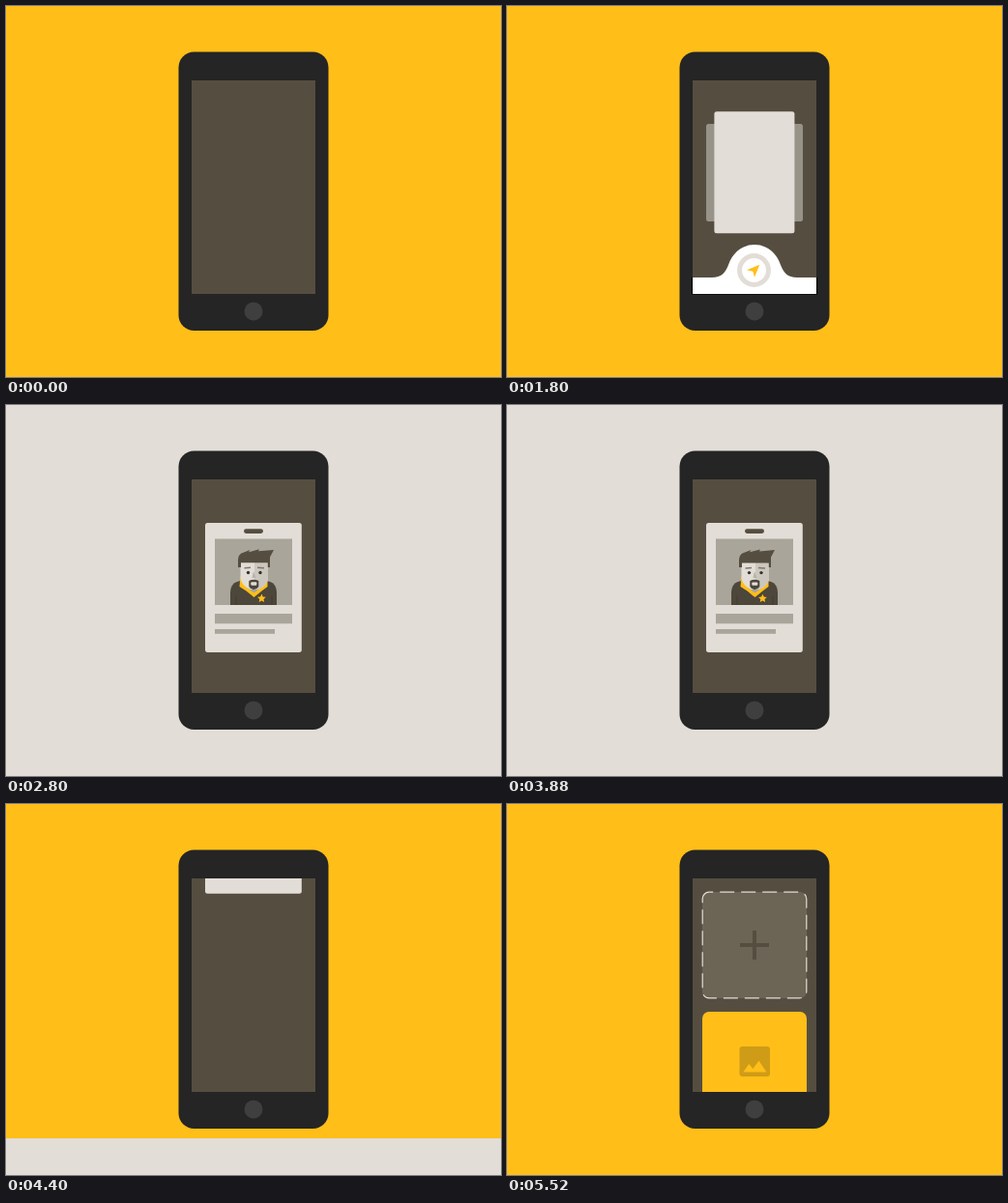
An HTML page for the animation above (6320 ms loop, 512 px wide and 384 px high).

```html
<!DOCTYPE html>
<html lang="en">
<head>
<meta charset="utf-8">
<title>Phone badge loop</title>
<style>
html, body { margin: 0; width: 100%; height: 100%; overflow: hidden; background: #ffbe18; }
svg { display: block; width: 100%; height: 100%; }
</style>
</head>
<body>
<svg viewBox="0 0 512 384">
  <defs>
    <clipPath id="screenClip"><rect x="192" y="77" width="128" height="221"/></clipPath>
    <clipPath id="barClip"><rect x="191" y="77" width="130" height="221.5"/></clipPath>
    <clipPath id="wipeClip"><rect id="wipe" x="216" y="138" width="80" height="100"/></clipPath>
    <clipPath id="photoClip"><rect x="216" y="138.5" width="80" height="68.5"/></clipPath>
  </defs>

  <rect width="512" height="384" fill="#ffbe18"/>
  <rect id="backdrop" width="512" height="384" fill="#e2ddd6"/>

  <rect x="178.5" y="47.5" width="155" height="288.5" rx="16" fill="#252525"/>
  <rect x="192" y="77" width="128" height="221" fill="#554e40"/>
  <circle cx="256" cy="316" r="9.5" fill="#3f3f3f"/>

  <g clip-path="url(#screenClip)">
    <rect id="side" x="206" y="122" width="100" height="101" rx="2.5" fill="#e2ddd6" opacity=".48"/>
    <rect id="card" rx="2.5" fill="#e2ddd6"/>

    <g id="badge">
      <rect id="slot" x="246" y="128.2" width="20" height="4.8" rx="2.4" fill="#554e40"/>
      <g clip-path="url(#wipeClip)">
        <g fill="#aaa59b">
          <rect x="216" y="138.5" width="80" height="68.5"/>
          <rect x="216" y="216" width="80" height="10.3"/>
          <rect x="216" y="232" width="62" height="4.8"/>
        </g>
        <g clip-path="url(#photoClip)">
          <g id="person">
            <path d="M232 208V195Q232 183 243 182H269Q280 183 280 195V208Z" fill="#4d463a"/>
            <path d="M238 197V208M275 197V208" stroke="#3f392f" stroke-width=".8"/>
            <path d="M242.500 177H270.500V188L264.500 192.500 256.500 199 248.500 192.500 241.500 188Z" fill="#ffbe18"/>
            <path d="M249 189H264L256.500 194.500Z" fill="#aaa59b"/>
            <path d="M242.500 161H271V180Q270 187 261 191H252.500Q244 187 242.500 180Z" fill="#e2ddd6"/>
            <path d="M257 161H271V180Q270 187 261 191H257Z" fill="#cbc7bf"/>
            <path d="M240 168V160Q240 154 246 152.500L252.500 150 251 152.200 262 149.300 261 151.300 277 150 273 157.500V168H270.800V163.300H243V168Z" fill="#554e40"/>
            <path d="M246.500 168.800L253 168.300M260 168.300L267 168.800" stroke="#7d766a" stroke-width="1.500"/>
            <circle cx="250.500" cy="173.500" r="1.700" fill="#38332a"/>
            <circle cx="263" cy="173.500" r="1.700" fill="#38332a"/>
            <path d="M256 172L254.500 179H258.500Z" fill="#b9b4aa"/>
            <path d="M251.300 182Q256.300 179.500 261.300 182V188Q259.500 191 256.300 191 253 191 251.300 188Z" fill="#4d463a"/>
            <rect x="253.300" y="183.300" width="6" height="3.400" rx="1" fill="#e2ddd6"/>
            <path id="star" fill="#ffbe18"/>
          </g>
        </g>
      </g>
    </g>

    <g id="addBox">
      <rect x="202" y="91" width="108" height="110" rx="7" fill="#6c6555"/>
      <rect x="202.200" y="91.200" width="107.600" height="109.600" rx="7" fill="none" stroke="#e2ddd6"
        stroke-width="1.200" stroke-dasharray="15 7" stroke-dashoffset="11"/>
      <path d="M241 146H271M256 131V161" stroke="#554e40" stroke-width="4"/>
    </g>
    <g id="imageBox">
      <rect x="202" y="215" width="108" height="110" rx="7" fill="#ffbe18"/>
      <rect x="240.500" y="251" width="31.500" height="31" rx="3" fill="#cf9c17"/>
      <path d="M244.300 277.500L250.300 269 254.300 274 260.500 265.800 268.500 277.500Z" fill="#ffbe18"/>
    </g>
  </g>

  <g id="bar" clip-path="url(#barClip)">
    <g id="barBody">
      <rect x="191" y="281" width="130" height="18" fill="#000"/>
      <path id="bump" fill="#fff"/>
      <g id="button">
        <circle cx="255.500" cy="273.500" r="17.500" fill="#e2ddd6"/>
        <circle cx="255.500" cy="273.500" r="12.500" fill="#fff"/>
        <path d="M261.300 267.800L248 273.300 254.400 274.800 256 280.800Z" fill="#ffbe18"/>
      </g>
    </g>
  </g>
</svg>
<script>
const LOOP = 6320, STEP = 40;
const el = {};
document.querySelectorAll('[id]').forEach(n => el[n.id] = n);

const inOut = u => u < .5 ? 4 * u ** 3 : 1 - 4 * (1 - u) ** 3;
const inOutQuad = u => u < .5 ? 2 * u * u : 1 - 2 * (1 - u) ** 2;
const out = u => 1 - (1 - u) ** 3;
const mix = (a, b, k) => a + (b - a) * k;

// Eased progress of t from start to end
const ramp = (t, start, end, ease = inOut) =>
  ease(Math.min(1, Math.max(0, (t - start) / (end - start))));

const set = (node, attrs) => {
  for (const key in attrs) node.setAttribute(key, attrs[key]);
};
const show = (node, on) => set(node, { display: on ? 'inline' : 'none' });
const shift = (node, y) => set(node, { transform: `translate(0 ${y})` });
const scale = (node, x, y, k) =>
  set(node, { transform: `translate(${x} ${y}) scale(${k}) translate(${-x} ${-y})` });

function starPath(x, y, r) {
  const points = Array.from({ length: 10 }, (_, i) => {
    const a = i * Math.PI / 5 - Math.PI / 2, d = i % 2 ? r * .48 : r;
    return `${x + d * Math.cos(a)} ${y + d * Math.sin(a)}`;
  });
  return `M${points.join('L')}Z`;
}

// White bar with a hump that narrows as it sinks
function bumpPath(k) {
  const wide = [44, 34, 30, 27, 23, 13, 0], flat = [30, 24, 19, 15, 11, 7, 0];
  const tall = [0, 0, .15, .38, .74, 1, 1], low = [0, 0, .2, .5, .8, 1, 1];
  const left = wide.map((w, i) =>
    [256 - mix(flat[i], w, k), 281 - 34 * k * mix(low[i], tall[i], k)]);
  const right = left.slice(0, -1).reverse().map(([x, y]) => [512 - x, y]);
  const [first, ...rest] = [...left, ...right];
  return `M192 281H${first[0]}C${rest.join(' ')}H320V298H192Z`;
}

function drawCards(t) {
  const rise = 189 * (1 - ramp(t, 20, 460, out));
  const grow = ramp(t, 1970, 2360, inOutQuad);
  const leave = 179 * ramp(t, 4195, 4480);
  set(el.card, {
    x: mix(214.4, 206, grow),
    y: mix(109.2, 122, grow) + rise - leave,
    width: mix(83, 99.8, grow),
    height: mix(126, 134, grow)
  });
  const spread = ramp(t, 600, 760, out) - ramp(t, 1984, 2144, inOutQuad);
  show(el.side, t > 600 && t < 2144);
  scale(el.side, 256, 172.5, mix(.82, 1, spread));
}

function drawBadge(t) {
  show(el.badge, t > 2440 && t < 4340);
  const open = ramp(t, 2450, 2670) - ramp(t, 4112, 4332);
  set(el.wipe, { width: 80 * open });
  scale(el.slot, 256, 130.6, ramp(t, 2460, 2660) - ramp(t, 4060, 4270));
  shift(el.person, 60 * (1 - ramp(t, 2560, 2800, out) + ramp(t, 3860, 4120)));
}

function drawBar(t) {
  show(el.bar, t > 20 && t < 2300);
  shift(el.barBody, 18 * (1 - ramp(t, 20, 200, out) + ramp(t, 1980, 2240)));
  set(el.bump, { d: bumpPath(ramp(t, 100, 340) - ramp(t, 1850, 2113)) });
  scale(el.button, 255.5, 273.5, ramp(t, 260, 480, out) - ramp(t, 1780, 1980));
}

function draw(t) {
  const edge = 384 * (1 - ramp(t, 1783, 2195) + ramp(t, 4108, 4520));
  set(el.backdrop, { y: edge });
  drawCards(t);
  drawBadge(t);
  drawBar(t);
  show(el.addBox, t > 4480);
  shift(el.addBox, 207 * (1 - ramp(t, 4490, 5100, out)));
  show(el.imageBox, t > 5080);
  shift(el.imageBox, 84 * (1 - ramp(t, 5100, 5520, out)));
}

set(el.star, { d: starPath(264.4, 200.2, 4.6) });
const began = performance.now();
function tick() {
  const t = (performance.now() - began) % LOOP;
  draw(Math.floor(t / STEP) * STEP);
  requestAnimationFrame(tick);
}
tick();
</script>
</body>
</html>
```
